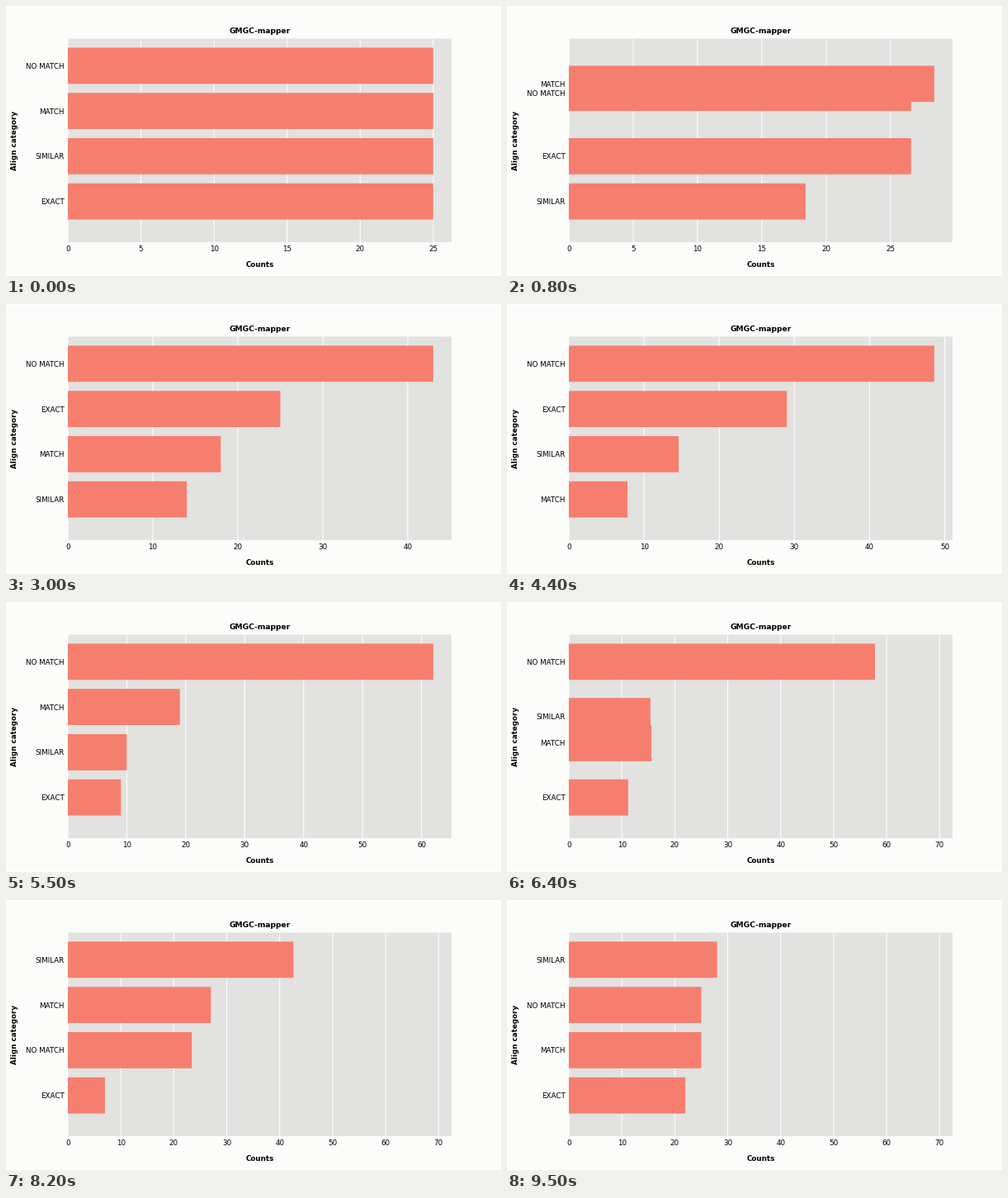
These frames come from a looping animation (600 by 327 pixels, 9.6 s). A matplotlib script:

```python
import numpy as np
import matplotlib.pyplot as plt
from matplotlib.animation import FuncAnimation
from matplotlib.patches import Rectangle
from matplotlib.ticker import MaxNLocator

W, H, DPI = 600, 327, 100
LEFT, RIGHT, TOP, BOTTOM = 75, 540, 39.5, 286
STEPS = 5  # frames from one reading to the next

PAPER, PANEL, SALMON = "#fcfcfa", "#e2e2e0", "#f67e6e"

NAMES = ["EXACT", "SIMILAR", "MATCH", "NO MATCH"]
COUNTS = np.array([
    [25, 25, 25, 25], [26, 22, 26, 26], [27, 16, 30, 27], [28, 13, 30, 29],
    [29, 10, 26, 35], [27, 12, 22, 39], [25, 14, 18, 43], [27, 15, 14, 44],
    [29, 17, 11, 43], [29, 14, 7, 50], [20, 12, 14, 54], [9, 10, 19, 62],
    [8, 9, 14, 69], [12, 17, 16, 55], [16, 20, 22, 42], [18, 33, 18, 31],
    [5, 45, 27, 23], [10, 39, 27, 24], [17, 32, 28, 23], [22, 28, 25, 25],
])
# Rank 1 is the smallest; ties keep the column order.
RANKS = COUNTS.argsort(axis=1, kind="stable").argsort(axis=1) + 1


def tween(rows):
    """Linear interpolation of every column between the readings."""
    keys = np.arange(len(rows))
    t = np.arange((len(rows) - 1) * STEPS + 1) / STEPS
    return np.column_stack([np.interp(t, keys, col) for col in rows.T])


def pt(px):
    return px * 72 / DPI


widths = tween(COUNTS)
places = tween(RANKS)
# The axis grows with the largest value so far and never shrinks.
limits = 1.05 * np.maximum.accumulate(widths.max(axis=1))

plt.rcParams["font.family"] = "DejaVu Sans"
fig = plt.figure(figsize=(W / DPI, H / DPI), dpi=DPI, facecolor=PAPER)
for y in (0, H - 2):
    fig.add_artist(Rectangle((0, y / H), 1, 2 / H, color="white", lw=0))

ax = fig.add_axes([LEFT / W, 1 - BOTTOM / H, (RIGHT - LEFT) / W, (BOTTOM - TOP) / H],
                  facecolor=PANEL)
ax.patch.set_snap(False)
ax.spines[:].set_visible(False)
ax.set_axisbelow(True)
ax.grid(axis="x", color="white", lw=pt(1.1))
ax.tick_params(length=0, pad=pt(4), labelsize=pt(8.8), labelcolor="black")
ax.xaxis.set_major_locator(MaxNLocator(9, steps=[1, 2, 2.5, 5, 10]))
ax.xaxis.set_major_formatter("{x:.0f}")

bars = ax.barh(places[0], widths[0], height=0.8, color=SALMON, lw=0, snap=False)
ax.set_ylim(0.1, 4.6)


def caption(x, y, text, size, **kw):
    fig.text(x / W, 1 - y / H, text, size=pt(size), weight="bold",
             ha="center", va="baseline", **kw)


caption(307.5, 32.8, "GMGC-mapper", 9.1)
caption(307.5, 316, "Counts", 8.8)
caption(12.6, 162.7, "Align category", 8.8, rotation=90, rotation_mode="anchor")


def draw(i):
    for bar, width, place in zip(bars, widths[i], places[i]):
        bar.set_width(width)
        bar.set_y(place - 0.4)
    ax.set_yticks(places[i], NAMES)
    ax.set_xlim(0, limits[i])
    plt.setp(ax.get_xgridlines(), snap=False)
    return list(bars)


anim = FuncAnimation(fig, draw, frames=len(widths), interval=100,
                     repeat=True, repeat_delay=0, blit=False)
plt.show()
```
